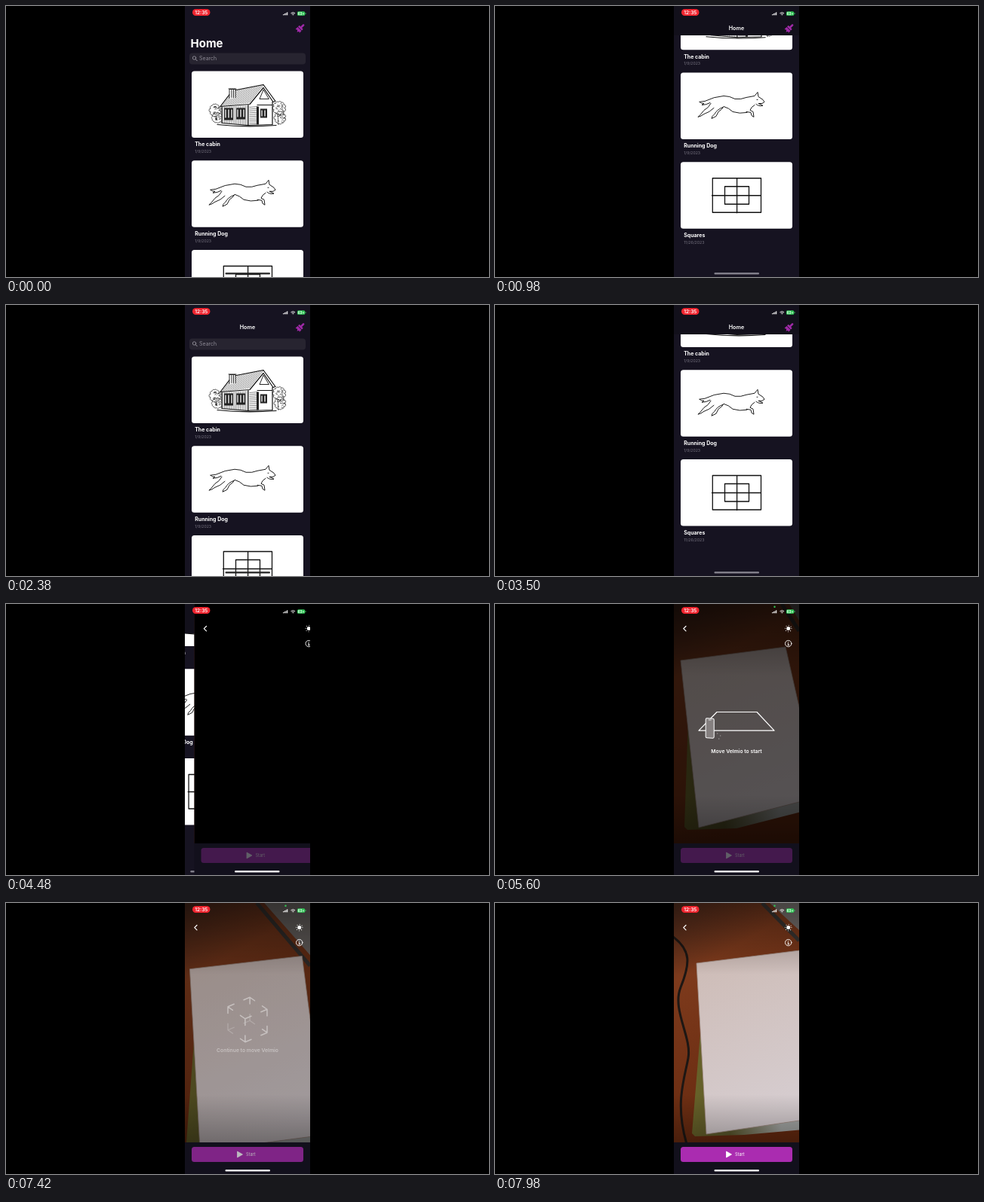
An HTML page that plays this animation: 640 px wide and 360 px high, repeating every 8000 ms.

```html
<!DOCTYPE html>
<html lang="en">
<head>
<meta charset="utf-8">
<title>Drawing app</title>
<style>
  html, body { margin: 0; height: 100%; overflow: hidden; background: #000; }
  svg { display: block; width: 640px; height: 360px; }
  text { font-family: Inter, "Open Sans", sans-serif; fill: #fff; }
  .mid { text-anchor: middle; font-weight: 600; }
  .ink { fill: none; stroke: #111; stroke-linecap: round; stroke-linejoin: round; }
  .line { fill: none; stroke: #fff; stroke-linecap: round; stroke-linejoin: round; }
</style>
</head>
<body>
<svg viewBox="0 0 640 360">
  <defs>
    <clipPath id="phone"><rect x="237" width="166" height="360"/></clipPath>
    <clipPath id="below"><rect x="237" y="39" width="166" height="321"/></clipPath>
    <clipPath id="view"><rect x="237" width="166" height="318"/></clipPath>
    <linearGradient id="wood" x1="0" y1="0" x2=".3" y2="1">
      <stop offset="0" stop-color="#4d2a1c"/><stop offset=".3" stop-color="#7d3a1c"/><stop offset="1" stop-color="#66290f"/>
    </linearGradient>
    <linearGradient id="sheet" x1="0" y1="0" x2=".3" y2="1">
      <stop offset="0" stop-color="#cdbbb5"/><stop offset="1" stop-color="#d6cdd0"/>
    </linearGradient>
    <linearGradient id="cover">
      <stop offset="0" stop-color="#686329"/><stop offset=".3" stop-color="#5b572c"/><stop offset=".7" stop-color="#a3a5a3"/>
    </linearGradient>
    <linearGradient id="vignette" x1="0" y1="0" x2="0" y2="1">
      <stop offset="0" stop-opacity=".4"/><stop offset=".3" stop-opacity="0"/>
      <stop offset=".8" stop-opacity="0"/><stop offset="1" stop-opacity=".3"/>
    </linearGradient>
  </defs>

  <g clip-path="url(#phone)">
    <g id="home">
      <rect x="237" width="166" height="360" fill="#161321"/>
      <g clip-path="url(#below)">
        <g id="list">
          <text x="244.5" y="54.5" font-size="15" font-weight="700">Home</text>
          <rect x="243" y="62.5" width="154" height="15" rx="4" fill="#272430"/>
          <path class="line" d="M251.2 70.7l2 2" style="stroke:#a09da8"/>
          <circle class="line" cx="249.5" cy="69" r="2.2" style="stroke:#a09da8;stroke-width:.8"/>
          <text x="256" y="72.4" font-size="7" style="fill:#8c8994">Search</text>
        </g>
      </g>
      <rect id="bar" x="237" width="166" height="39" fill="#12101b"/>
      <text id="title" class="mid" x="320" y="32" font-size="7.2">Home</text>
      <g transform="translate(390 29.5) rotate(45)" fill="#a02aa8">
        <rect x="-1.3" y="-7" width="2.6" height="6" rx="1.2"/>
        <rect x="-3.6" y="-1.8" width="7.2" height="2.6" rx=".8"/>
        <path d="M-3.6 1.5h7.2v3.6l-1.8-.8-1.2 2.5-1.4-2.3-2.8 1z"/>
      </g>
      <rect id="grip" x="290.5" y="354.3" width="59.5" height="2.1" rx="1"/>
    </g>

    <g id="camera">
      <rect x="237" width="166" height="360" fill="#12101c"/>
      <g clip-path="url(#view)">
        <rect x="237" width="166" height="318" fill="url(#wood)"/>
        <path id="cable" d="M232 42C262 62 258 82 246 112S261 178 256 206S238 266 254 320" fill="none" stroke="#1d1714" stroke-width="3"/>
        <path id="cushion" fill="#77716e"/>
        <path id="seam" fill="none" stroke="#393431" stroke-width="5"/>
        <path id="magazine" fill="url(#cover)"/>
        <path id="paper" fill="url(#sheet)" stroke="#a4928b" stroke-width=".8"/>
        <rect x="237" width="166" height="318" fill="url(#vignette)"/>
        <rect id="dim" x="237" width="166" height="318"/>
      </g>
      <g id="start">
        <rect x="246" y="324" width="148" height="20" rx="3.5" fill="#aa2cb0"/>
        <path d="M306.5 330v8l7-4z" fill="#fff" stroke="#fff" stroke-width=".8" stroke-linejoin="round"/>
        <text x="318" y="336.2" font-size="5.6">Start</text>
      </g>
      <path class="line" d="M253 29.5l-3.2 3.2 3.2 3.2" stroke-width="1.2"/>
      <circle cx="388.7" cy="32.6" r="2.5" fill="#fff"/>
      <circle class="line" cx="388.7" cy="32.6" r="4.2" stroke-width="1.1" stroke-dasharray="0 3.299"/>
      <circle class="line" cx="388.7" cy="52.6" r="4.2" stroke-width=".9"/>
      <path class="line" d="M388.7 50.4v.1M388 52.2h.8v2.5m-1 0h2" stroke-width=".9"/>
      <g id="plane">
        <path class="line" d="M294 143.5h53l23 24.7H270z" stroke-width="1.2"/>
        <g id="device">
          <path class="line" d="M10 7h.1M14 10h.1M12 14h.1" stroke-width=".7"/>
          <rect x="-5.5" y="-13" width="11" height="26" rx="1.6" fill="#858080" stroke="#fff" stroke-width="1" transform="skewY(2)"/>
          <path class="line" d="M-1.5-11h3" stroke-width=".8"/>
        </g>
        <text class="mid" x="320" y="198.4" font-size="6.8">Move Velmio to start</text>
      </g>
      <g id="cube">
        <path id="far" class="line" stroke-width="1.3" opacity=".5"/>
        <path id="near" class="line" stroke-width="1.5"/>
        <text class="mid" x="320" y="198.4" font-size="6.8">Continue to move Velmio</text>
      </g>
      <rect x="290.5" y="354.3" width="59.5" height="2.1" rx="1" fill="#fff"/>
    </g>

    <rect x="247" y="4" width="23.5" height="9" rx="4.5" fill="#f0252f"/>
    <text class="mid" x="258.8" y="11" font-size="6.6">12:35</text>
    <path d="M367.6 12.3v-1.4m1.7 1.4v-2.2m1.7 2.2v-3.1m1.7 3.1v-4" stroke="#fff" stroke-width="1.1"/>
    <path class="line" d="M377.8 9.4q2.5-2 5 0M379 10.8q1.3-1 2.6 0M380.3 12v.1" stroke-width=".9"/>
    <rect x="386" y="7.2" width="10.2" height="5.6" rx="1.6" fill="#34c759"/>
    <path d="M397 9v2" stroke="#34c759" stroke-width=".8"/>
    <text class="mid" x="391.1" y="11.7" font-size="4.5">63+</text>
    <circle id="lamp" cx="370.5" cy="3.7" r="1.2" fill="#32c553"/>
  </g>
</svg>

<script>
const $ = id => document.getElementById(id);
const lerp = (a, b, p) => a + (b - a) * p;
const smooth = (t, a, b) => {
  const p = Math.min(1, Math.max(0, (t - a) / (b - a)));
  return p * p * (3 - 2 * p);
};
const show = (id, v) => $(id).setAttribute('opacity', v);
const shift = (id, x, y) => $(id).setAttribute('transform', `translate(${x} ${y})`);
const draw = (id, d) => $(id).setAttribute('d', d);

// Values at time t, eased between [time, ...values] keys.
function track(keys, t) {
  let i = 0;
  while (i < keys.length - 2 && t > keys[i + 1][0]) i++;
  const [a, b] = [keys[i], keys[i + 1]], p = smooth(t, a[0], b[0]);
  return a.slice(1).map((v, k) => lerp(v, b[k + 1], p));
}

let seed = 7;
const rand = () => (seed = seed * 16807 % 2147483647) / 2147483647;

function bush(cx, cy, rx, ry) {
  let d = '';
  for (let i = 0; i <= 11; i++) {
    const a = i / 11 * 2 * Math.PI;
    const p = `${cx + rx * Math.cos(a)} ${cy + ry * Math.sin(a)}`;
    d += i ? `A2.2 2.2 0 0 1 ${p}` : `M${p}`;
  }
  for (let i = 0; i < 16; i++) {
    const a = rand() * 6.28, r = Math.sqrt(rand()) * .8;
    d += `M${cx + rx * r * Math.cos(a)} ${cy + ry * r * Math.sin(a)}q1-1.5 2 .3`;
  }
  return d;
}

// Lines joining matching points of two segments.
function hatch(n, [ax, ay, bx, by], [cx, cy, dx, dy]) {
  let d = '';
  for (let i = 0; i <= n; i++) {
    const p = i / n;
    d += `M${lerp(ax, bx, p)} ${lerp(ay, by, p)}L${lerp(cx, dx, p)} ${lerp(cy, dy, p)}`;
  }
  return d;
}

// Each picture is drawn relative to its card's top left corner.
const cabin = `
  <path class="ink" stroke-width=".65" d="${bush(31, 52, 6, 8)}${bush(34, 62, 7, 6)}${bush(116, 49, 7, 8)}${bush(117, 62, 6, 8)}M114 56l1 15"/>
  <path d="M40 47L75 43 95 19 107 41V71L75 72 40 69z" fill="#fff"/>
  <path class="ink" stroke-width=".5" d="${hatch(15, [54, 26, 95, 18], [38, 47, 76, 42])}${hatch(14, [41, 48, 74, 46], [41, 69, 74, 72])}${hatch(9, [77, 48, 77, 70], [87, 47, 87, 70])}"/>
  <path class="ink" stroke-width="1.2" d="M54 26L95 18 111 40 108 41 95 22 77 44 38 47zM40 48V69L75 72 107 71V41M75 45V72M34 71Q70 75 112 72M87 45H106"/>
  <path d="M50 24h8v11l-8 2z" fill="#fff"/>
  <path class="ink" stroke-width=".9" d="M50 36V24h8V35M49 23.5h10M53 25v10M55.5 25v10M95 25l-5 12h12z"/>
  <path d="M43 49h12v16H43zM59 49h12v15H59zM91 50h9v12h-9zM86 47h3v24h-3z" fill="#222"/>
  <path d="M45 51v11m4-11v11m4-11v11M61 51v10m4-10v10m4-10v10M93 52v8m4-8v8" stroke="#fff" stroke-width="1.3"/>`;

const dog = `<path class="ink" stroke-width=".95" d="M25 39q4-1 7-1 12-6 25-7 8 0 15 4 8 1 15-2l11-2 4-5 1 6 6 4 2 3-3 2-5 0q3 1 6 3-6 1-9-2M101 36h1M98 43q-5 3-6 7l4 2 1 7-3-2-1-4-6-1M88 53q-10 2-19-1-5-5-12-7-2 4-7 7l-3 6-6 3q0-3 4-6 3-6 11-9M40 41q-3 6-9 9l-5 6-3 3q4-1 8-4 7-2 13-8M25 39q2 2 6 2l-3 2q6 0 11-3"/>`;

const squares = `<path class="ink" stroke-width="1.3" d="M42.3 21.5h64.2V67H42.3zM58.5 32.5h32V56h-32zM74.6 21.5V67.5M41.5 44.5h65"/>`;

$('list').innerHTML += [
  ['The cabin', '1/9/2023', cabin],
  ['Running Dog', '1/9/2023', dog],
  ['Squares', '11/26/2023', squares]
].map(([name, date, art], i) => `
  <g transform="translate(246 ${86.5 + i * 118.75})">
    <rect width="148" height="88.5" rx="3.5" fill="#fff"/>${art}
    <text x="4.2" y="99.8" font-size="7" font-weight="700">${name}</text>
    <text x="4.2" y="108.6" font-size="5.2" style="fill:#777480">${date}</text>
  </g>`).join('');

const scrollKeys = [[200, 0], [1050, 119], [1160, 119], [2060, 18], [2600, 18], [3350, 119]];

// Corners of the sheet, clockwise from top left.
const paperKeys = [
  [4400, 252, 84, 390, 66, 434, 264, 274, 304],
  [5600, 246, 75, 385, 57, 430, 256, 270, 297],
  [6580, 200, 102, 341, 88, 409, 350, 215, 372],
  [7980, 267, 80, 420, 61, 430, 285, 280, 307]
];
// Cushion edge (top x, right y) and cable offset.
const deskKeys = [[4400, 385, 34, -50], [5600, 380, 36, -50], [6580, 292, 145, -70], [7980, 354, 50, 0]];

function drawHome(t) {
  const [s] = track(scrollKeys, t);
  shift('list', 0, -s);
  show('title', smooth(s, 10, 17));
  show('bar', smooth(s, 18, 50));
  $('grip').setAttribute('fill', s < 58 ? '#222' : '#8b8894');
}

function drawDesk(t) {
  const [ax, ay, bx, by, cx, cy, dx, dy] = track(paperKeys, t);
  const [edge, side, cable] = track(deskKeys, t);
  draw('paper', `M${ax} ${ay}L${bx} ${by} ${cx} ${cy} ${dx} ${dy}z`);
  draw('magazine', `M${lerp(ax, dx, .4)} ${lerp(ay, dy, .4)}L${dx - 19} ${dy - 1}l4 4 65-2L${cx} ${cy + 14}V${cy}L${dx} ${dy}z`);
  draw('cushion', `M${edge + 10} 0L403 ${side - 14}V0z`);
  draw('seam', `M${edge} 0L403 ${side}`);
  shift('cable', cable, 0);
}

// Corner brackets of a turning cube.
function drawCube(angle) {
  const size = 37, tilt = .58, c = Math.cos(angle), n = Math.sin(angle);
  const spot = (x, y, z) => [
    320 + size * (x * c - z * n),
    155 - size * ((x * n + z * c) * Math.sin(tilt) + y * Math.cos(tilt))
  ].map(v => v.toFixed(2)).join(' ');
  let near = '', far = '';
  for (let i = 0; i < 8; i++) {
    const p = [i & 1, i >> 1 & 1, i >> 2].map(v => v - .5);
    let d = '';
    p.forEach((v, k) => {
      const q = [...p];
      q[k] = v * .44;
      d += `M${spot(...p)}L${spot(...q)}`;
    });
    if (p[1] < 0 && p[0] * n + p[2] * c > 0) far += d; else near += d;
  }
  draw('near', near);
  draw('far', far);
}

function frame() {
  const t = performance.now() % 8000;
  drawHome(t);
  const push = 1 - (1 - Math.min(1, Math.max(0, (t - 4250) / 400))) ** 3;
  shift('home', -50 * push, 0);
  shift('camera', 166 * (1 - push), 0);
  show('camera', push > 0 ? 1 : 0);
  show('lamp', t > 4650 ? 1 : 0);

  drawDesk(t);
  const ready = smooth(t, 7200, 7600);
  show('dim', lerp(lerp(1, .6, smooth(t, 4600, 4950)), 0, ready));
  show('start', lerp(.33, 1, ready));
  const swap = smooth(t, 6050, 6250);
  show('plane', smooth(t, 4750, 5050) * (1 - swap));
  show('cube', swap * (1 - ready));
  shift('device', 320 - 35.3 * Math.cos((t - 5600) / 2400 * 2 * Math.PI), 165);
  drawCube(.245 + (t - 6580) * .0005);
  requestAnimationFrame(frame);
}
frame();
</script>
</body>
</html>
```
